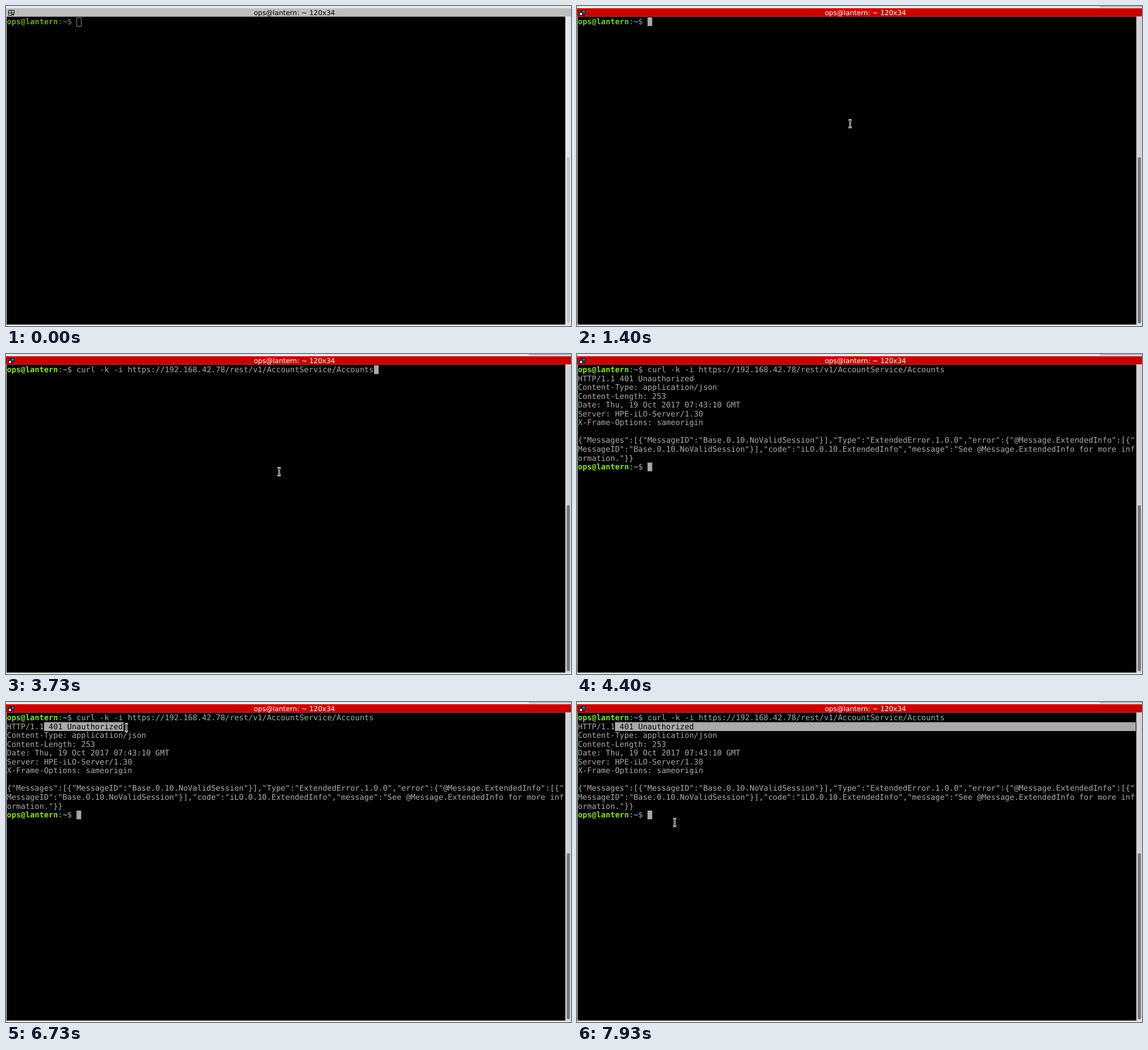
Recreate the animation shown at these times as an HTML page. Size 995x563 px, loop 8 s.

```html
<!DOCTYPE html>
<html lang="en">
<head>
<meta charset="utf-8">
<title>Terminal session</title>
<style>
  html, body { margin: 0; width: 100%; height: 100%; overflow: hidden; background: #e9e9e4; }
  svg { display: block; width: 995px; height: 563px; }
  text { white-space: pre; text-rendering: geometricPrecision; }
  .title { font: 12px "DejaVu Sans", sans-serif; text-anchor: middle; }
  .mono { font: 13.59px "DejaVu Sans Mono", monospace; fill: #aaa; }
  .user { font-weight: bold; fill: #8ae234; }
  .path { font-weight: bold; fill: #729fcf; }
  .beam path { fill: none; stroke: #fff; stroke-width: 3; }
  .beam path + path { stroke: #000; stroke-width: 1; }

  .idle, .live, .command, .output, .block, .blink, .selection { animation: 8s step-end infinite; }
  .idle { animation-name: idle; }
  .live { animation-name: live; }
  .command { animation-name: command; }
  .output { animation-name: output; }
  .block { animation-name: block; }
  .blink { animation-name: blink; }
  .selection { animation-name: select; }
  .wake { animation: wake 8s linear infinite; }
  .beam { animation: show-beam 8s step-end infinite, move-beam 8s linear infinite; }

  @keyframes idle { 0% { opacity: 1 } 16.625%, 100% { opacity: 0 } }
  @keyframes live { 0% { opacity: 0 } 16.625%, 100% { opacity: 1 } }
  @keyframes wake { 0%, 16.5% { opacity: .74 } 17.5% { opacity: .9 } 21.625%, 100% { opacity: 1 } }
  @keyframes command { 0% { opacity: 0 } 28.375%, 100% { opacity: 1 } }
  @keyframes output { 0% { opacity: 0 } 53.375%, 100% { opacity: 1 } }
  @keyframes block {
    0% { transform: translate(124.25px, 20px) }
    28.375% { transform: translate(648px, 20px) }
    51.625% { transform: translate(1.5px, 35.55px) }
    53.375%, 100% { transform: translate(124.25px, 191.05px) }
  }
  @keyframes blink {
    0%, 24.125%, 39.125%, 59.125%, 74.125%, 89.125% { opacity: 0 }
    16.625%, 28.375%, 46.625%, 66.625%, 81.625%, 96.625%, 100% { opacity: 1 }
  }
  @keyframes select {
    0% { width: 0 }
    76.625% { width: 0; animation-timing-function: steps(17) }
    84.125% { width: 139.1px }
    85%, 100% { width: 916.5px }
  }
  @keyframes show-beam {
    0% { opacity: 0 }
    13.375% { opacity: 1 }
    51.625% { opacity: 0 }
    62.5%, 100% { opacity: 1 }
  }
  @keyframes move-beam {
    0%, 13.375% { transform: translate(540px, 552px); animation-timing-function: ease-out }
    17.3%, 62.5% { transform: translate(481px, 207px); animation-timing-function: ease-in-out }
    71.625% { transform: translate(70px, 49px) }
    73.375%, 76.625% { transform: translate(70px, 46px); animation-timing-function: ease-in-out }
    84.125% { transform: translate(212px, 45px) }
    86.625%, 93.375% { transform: translate(218px, 42px); animation-timing-function: ease-in }
    95.5% { transform: translate(244px, 120px) }
    97.8% { transform: translate(205px, 220px); animation-timing-function: ease-out }
    99.125%, 100% { transform: translate(172px, 212px) }
  }
</style>
</head>
<body>
<svg viewBox="0 0 995 563">
  <defs>
    <text id="prompt" class="mono" x="1.5" y="32"><tspan class="user">ops@lantern</tspan>:<tspan class="path">~</tspan>$</text>
    <clipPath id="selected"><rect class="selection" x="67" y="35.5" height="15.55"/></clipPath>
  </defs>

  <rect width="995" height="563" fill="#e9e9e4"/>
  <rect x="1" y="18.5" width="984" height="542" fill="#000"/>

  <g class="idle">
    <rect y="4" width="995" height="14.5" fill="#bebebe"/>
    <path d="M21.5 5v13" stroke="#b0b0b0"/>
    <path d="M4.5 7.5h10v6M4.5 7.5v9h6M4.5 12h10M9.5 7.5v9" fill="none" stroke="#000"/>
    <path d="M10 14h5l-2.5 3z"/>
    <text class="title" x="508" y="15.8">ops@lantern: ~ 120x34</text>
    <rect x="985" y="18.5" width="10" height="542" fill="#e5e5e5"/>
    <rect x="987.5" y="266" width="5.5" height="292" rx="2.7" fill="#c3c3c3"/>
    <rect x="124.5" y="20.5" width="8" height="15" fill="none" stroke="#888"/>
  </g>

  <g class="live">
    <rect y="4" width="995" height="14.5" fill="#c80000"/>
    <rect x="920" y="-4" width="90" height="6.5" rx="3" fill="#b9b9c0"/>
    <g stroke="#000">
      <path d="M4.5 7.5h5v4h-5zM9.5 12.5h4v4h-4z" fill="#a00000" stroke="#700000"/>
      <rect x="9.5" y="7.5" width="5" height="5" fill="#1c86dc"/>
      <rect x="4.5" y="11.5" width="5" height="5" fill="#e8e8e8"/>
    </g>
    <text class="title" x="508" y="15.8" fill="#fff">ops@lantern: ~ 120x34</text>
    <rect x="985" y="18.5" width="10" height="542" fill="#d3d3d3"/>
    <rect x="987.5" y="266" width="5.5" height="292" rx="2.7" fill="#777"/>
  </g>

  <use href="#prompt" class="wake"/>
  <text class="mono command" x="124.25" y="32">curl -k -i https://192.168.42.78/rest/v1/AccountService/Accounts</text>

  <g class="output">
    <text class="mono" y="47.55"><tspan x="1.5">HTTP/1.1 401 Unauthorized</tspan><tspan x="1.5" dy="15.55">Content-Type: application/json</tspan><tspan x="1.5" dy="15.55">Content-Length: 253</tspan><tspan x="1.5" dy="15.55">Date: Thu, 19 Oct 2017 07:43:10 GMT</tspan><tspan x="1.5" dy="15.55">Server: HPE-iLO-Server/1.30</tspan><tspan x="1.5" dy="15.55">X-Frame-Options: sameorigin</tspan><tspan x="1.5" dy="31.1">{"Messages":[{"MessageID":"Base.0.10.NoValidSession"}],"Type":"ExtendedError.1.0.0","error":{"@Message.ExtendedInfo":[{"</tspan><tspan x="1.5" dy="15.55">MessageID":"Base.0.10.NoValidSession"}],"code":"iLO.0.10.ExtendedInfo","message":"See @Message.ExtendedInfo for more inf</tspan><tspan x="1.5" dy="15.55">ormation."}}</tspan></text>
    <use href="#prompt" y="171.05"/>
  </g>

  <g clip-path="url(#selected)">
    <rect x="67" y="35.5" width="917" height="15.55" fill="#aaa"/>
    <text class="mono" x="1.5" y="47.55" style="fill:#000">HTTP/1.1 401 Unauthorized</text>
  </g>

  <g class="block"><rect class="blink" width="8.2" height="15.3" fill="#aaa"/></g>

  <g class="beam">
    <path d="M-3 -6.5h2l1 1 1 -1h2M0 -6v12M-3 6.5h2l1 -1 1 1h2"/>
    <path d="M-3 -6.5h2l1 1 1 -1h2M0 -6v12M-3 6.5h2l1 -1 1 1h2"/>
  </g>
</svg>
</body>
</html>
```
